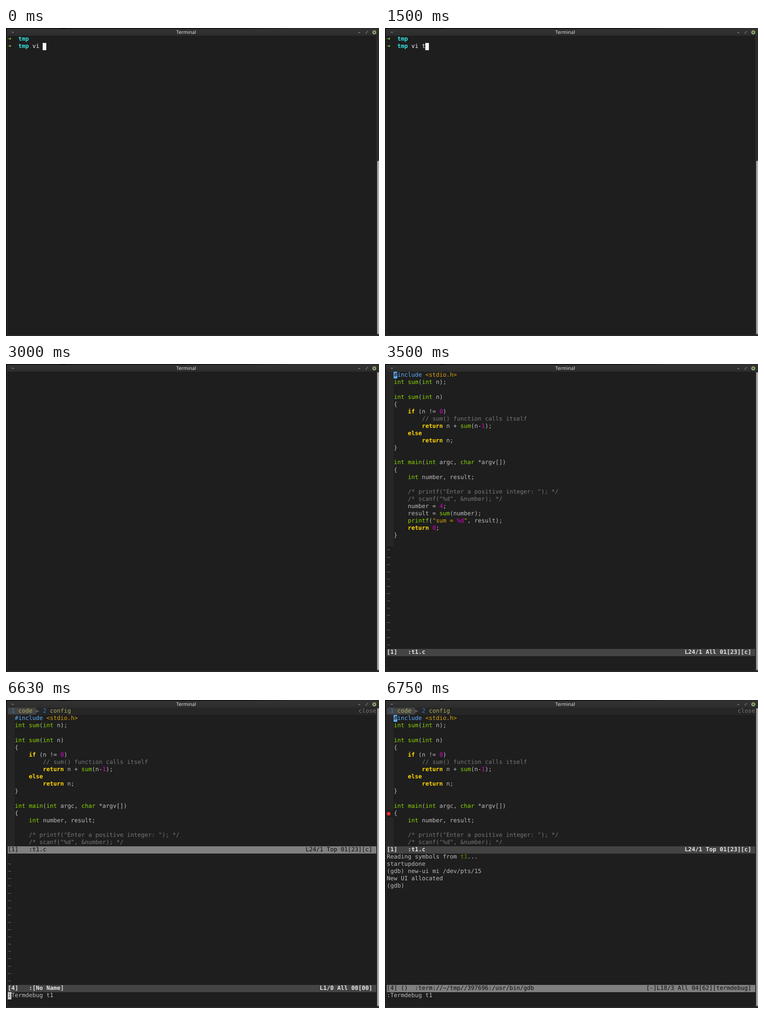
Animation of 824 by 680 pixels, one loop 8 s. Source, as an HTML page:

```html
<!DOCTYPE html>
<html lang="en">
<head>
<meta charset="utf-8">
<title>Terminal</title>
<style>
html, body { margin: 0; width: 100%; height: 100%; overflow: hidden; background: #1e1e1e; }
#stage {
  --cw: 7.74px; --rh: 16.09px;
  position: relative; width: 824px; height: 680px; overflow: hidden;
  background: #1e1e1e; color: #bcbcbc;
  font: 12.86px/var(--rh) "DejaVu Sans Mono", monospace;
  text-rendering: geometricPrecision; font-kerning: none; font-variant-ligatures: none;
}

/* window frame */
.frame, .frame * { position: absolute; }
.frame { inset: 0; }
.top { left: 0; top: 0; width: 824px; height: 2px; background: linear-gradient(90deg, #111 0 120px, #000 122px 130px, #111 132px 520px, #2a2a2a 640px); }
.left { left: 0; top: 0; width: 2px; height: 680px; background: #111; }
.edge { left: 2px; top: 2px; width: 1px; height: 677px; background: #343434; }
.foot { left: 2px; top: 678px; width: 822px; height: 1px; background: #343434; }
.title {
  left: 2px; top: 2px; width: 822px; height: 15px; background: linear-gradient(#333, #2c2c2c);
}
.title span {
  left: 0; width: 792px; top: 1px; text-align: center; color: #e2e2e2;
  font: 500 10.6px/15px "Noto Sans", sans-serif;
}
.frame svg { left: 0; top: 0; }
.track { left: 818px; top: 17px; width: 6px; height: 661px; background: #2a2a2a; }
.thumb { left: 819.5px; top: 293px; bottom: 4px; width: 4px; border-radius: 2px; background: #a9a9a7; }

/* character grid */
.at {
  --c: 0; --r: 0;
  position: absolute; margin: 0; white-space: pre; font: inherit;
  left: calc(4px + var(--c) * var(--cw));
  top: calc(17.3px + var(--r) * var(--rh));
}
.cur { width: var(--cw); height: var(--rh); background: #c6c6c6; color: #1e1e1e; }
.bar {
  display: flex; justify-content: space-between; box-sizing: border-box;
  width: 813.8px; height: var(--rh); padding-right: 8.6px;
}
.on { background: #444; color: #e4e4e4; font-weight: bold; }
.off { background: #808080; color: #0c0c0c; }
.tilde { color: #6a6a6a; }
.code {
  box-sizing: border-box; padding-left: calc(2 * var(--cw)); overflow: hidden;
  background: linear-gradient(#262626, #262626) 0 0 / calc(2 * var(--cw)) 100% no-repeat;
}
.tabs { background: #262626; color: #afaf5f; }
.tabs span { background: #444; }
.tabs i { color: #585858; font-style: normal; }
.tabs b { color: #1d84dc; font-weight: normal; }
.tabs em { color: #767676; font-style: normal; margin-right: -8.6px; }
.sh { color: #f0f0f0; }
.sh b { color: #34e2e2; }
.sh i { color: #7fcb35; font-style: normal; font-weight: bold; display: inline-block; width: var(--cw); }
.sh .typed { display: inline-block; vertical-align: top; overflow: hidden; width: 0; }
.t { color: #87d700; }
.k { color: #ffd700; font-weight: bold; }
.n { color: #e000cc; }
.s { color: #d7a00a; }
.p { color: #5fafff; }
.m { color: #767676; }
.g { color: #4e9a06; }
.sign { width: calc(2 * var(--cw)); height: var(--rh); background: #1e1e1e; }
.sign::after {
  content: ""; position: absolute; left: 0; top: 4.5px; width: 8px; height: 8px;
  border-radius: 50%; background: #ef2929;
}

/* timeline, 8 s */
.sh, .shcur, .typed, .thumb, .code, .hash, .edit, .cmd, .cmdcur, .split, .flash, .gdb {
  animation: 8s step-end infinite;
}
.sh { animation-name: shell; }
.shcur { background: #f4f4f4; animation-name: shell, shcur; }
.sh .typed { animation-name: typed; }
.thumb { animation-name: thumb; }
.code { animation-name: code; }
.hash { animation-name: hash; }
.edit { animation-name: edit; }
.cmd { animation-name: cmd; }
.cmdcur { animation-name: cmdcur; }
.split { animation-name: split; }
.flash { animation-name: flash; }
.gdb { animation-name: gdb; }

@keyframes shell { 0% { visibility: visible } 37.5%, 100% { visibility: hidden } }
@keyframes shcur {
  0% { --c: 10; --r: 1 }
  18.75% { --c: 11; --r: 1 }
  28.125% { --c: 12; --r: 1 }
  29.75% { --c: 13; --r: 1 }
  32.875% { --c: 14; --r: 1 }
  36%, 100% { --c: 0; --r: 2 }
}
@keyframes typed {
  0% { width: 0 }
  18.75% { width: calc(1 * var(--cw)) }
  28.125% { width: calc(2 * var(--cw)) }
  29.75% { width: calc(3 * var(--cw)) }
  32.875%, 100% { width: calc(4 * var(--cw)) }
}
@keyframes thumb { 0% { top: 293px } 37.5%, 100% { top: 18px } }
@keyframes code {
  0% { visibility: hidden; --r: 0; height: calc(24 * var(--rh)) }
  43.75% { visibility: visible; --r: 0; height: calc(24 * var(--rh)) }
  82.875%, 100% { visibility: visible; --r: 1; height: calc(18 * var(--rh)) }
}
@keyframes hash {
  0% { background: #5fafff; color: #1e1e1e }
  67.25% { background: transparent; color: #5fafff }
  84.375%, 100% { background: #5fafff; color: #1e1e1e }
}
@keyframes edit { 0% { visibility: hidden } 43.75% { visibility: visible } 82.875%, 100% { visibility: hidden } }
@keyframes cmd { 0% { visibility: hidden } 67.25%, 100% { visibility: visible } }
@keyframes cmdcur {
  0% { visibility: hidden; --c: 13; color: transparent }
  67.25% { visibility: visible; --c: 13; color: transparent }
  82.875% { visibility: visible; --c: 0; color: #1e1e1e }
  84.375%, 100% { visibility: hidden; --c: 0; color: #1e1e1e }
}
@keyframes split { 0% { visibility: hidden } 82.875%, 100% { visibility: visible } }
@keyframes flash { 0% { visibility: hidden } 82.875% { visibility: visible } 84.375%, 100% { visibility: hidden } }
@keyframes gdb { 0% { visibility: hidden } 84.375%, 100% { visibility: visible } }
</style>
</head>
<body>
<div id="stage">
  <div class="frame">
    <div class="left"></div>
    <div class="top"></div>
    <div class="title"><span>Terminal</span></div>
    <div class="edge"></div>
    <div class="track"></div>
    <div class="thumb"></div>
    <div class="foot"></div>
    <svg width="824" height="17" fill="none" stroke="#b4b4b4">
      <path d="M12.5 8.7 Q15 11.3 17.5 8.7"/>
      <path d="M778.5 10h4"/>
      <path d="M795.3 11.3l1.2-1.2M797.5 9.1l1.2-1.2M796.8 7.6h2.1v2.1M795 9.6v2.1h2.1" stroke="#999" stroke-width=".8"/>
      <circle cx="813.6" cy="9.6" r="4.4" fill="#92b372" stroke="none"/>
      <path d="M812 8l3.2 3.2M815.2 8l-3.2 3.2" stroke="#2d2d2d" stroke-width="1.1"/>
    </svg>
  </div>

  <pre class="at sh"><i>➜</i>  <b>tmp</b></pre>
  <pre class="at sh" style="--r:1"><i>➜</i>  <b>tmp</b> vi <span class="typed">t1.c</span></pre>
  <div class="at cur shcur"></div>

  <pre class="at code"><span class="p"><span class="hash">#</span>include</span> <span class="s">&lt;stdio.h&gt;</span>
<span class="t">int</span> <span class="t">sum</span>(<span class="t">int</span> n);

<span class="t">int</span> <span class="t">sum</span>(<span class="t">int</span> n)
{
    <span class="k">if</span> (n != <span class="n">0</span>)
        <span class="m">// sum() function calls itself</span>
        <span class="k">return</span> n + <span class="t">sum</span>(n-<span class="n">1</span>);
    <span class="k">else</span>
        <span class="k">return</span> n;
}

<span class="t">int</span> <span class="t">main</span>(<span class="t">int</span> argc, <span class="t">char</span> *argv[])
{
    <span class="t">int</span> number, result;

    <span class="m">/* printf("Enter a positive integer: "); */</span>
    <span class="m">/* scanf("%d", &amp;number); */</span>
    number = <span class="n">4</span>;
    result = <span class="t">sum</span>(number);
    <span class="t">printf</span>(<span class="s">"sum = <span class="n">%d</span>"</span>, result);
    <span class="k">return</span> <span class="n">0</span>;
}
</pre>

  <div class="edit">
    <pre class="at tilde" style="--r:24">~
~
~
~
~
~
~
~
~
~
~
~
~
~</pre>
    <div class="at bar on" style="--r:38"><span>[1]   :t1.c</span><span>L24/1 All 01[23][c]</span></div>
  </div>

  <div class="split">
    <div class="at bar tabs"><div><span> <b>1</b> code </span><i>▶</i> <b>2</b> config</div><em>close</em></div>
  </div>

  <div class="flash">
    <div class="at bar off" style="--r:19"><span>[1]   :t1.c</span><span>L24/1 Top 01[23][c]</span></div>
    <pre class="at tilde" style="--r:21">~
~
~
~
~
~
~
~
~
~
~
~
~
~
~
~
~</pre>
    <div class="at bar on" style="--r:38"><span>[4]   :[No Name]</span><span>L1/0 All 00[00]</span></div>
  </div>

  <div class="gdb">
    <div class="at sign" style="--r:14"></div>
    <div class="at bar on" style="--r:19"><span>[1]   :t1.c</span><span>L24/1 Top 01[23][c]</span></div>
    <pre class="at" style="--r:20">Reading symbols from <span class="g">t1</span>...
startupdone
(gdb) new-ui mi /dev/pts/15
New UI allocated
(gdb) </pre>
    <div class="at bar off" style="--r:38"><span>[4] ()  :term://~/tmp//397696:/usr/bin/gdb</span><span>[-]L18/3 All 04[62][termdebug]</span></div>
  </div>

  <pre class="at cmd" style="--r:39">:Termdebug t1</pre>
  <div class="at cur cmdcur" style="--r:39">:</div>
</div>
</body>
</html>
```
